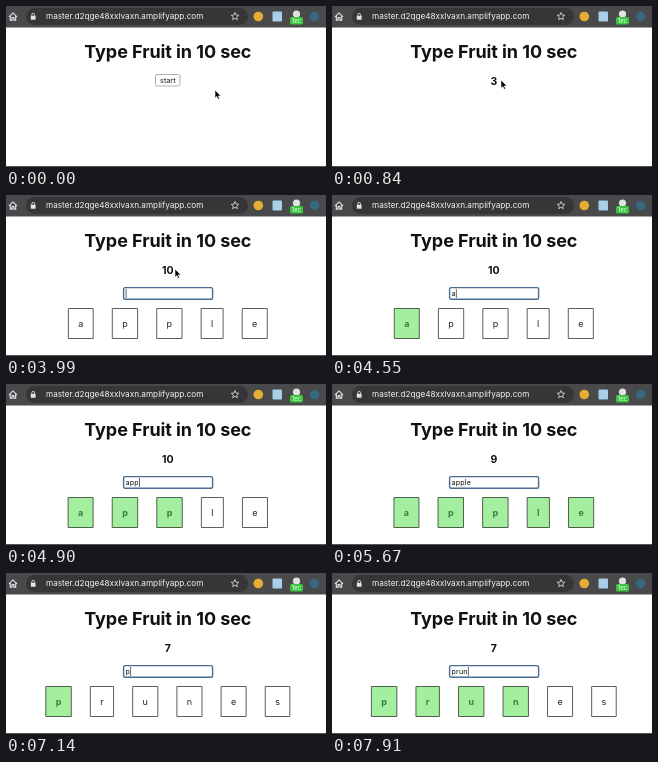
Recreate the animation shown at these times as an HTML page with a canvas. Size 320x161 px, loop 8 s.

```html
<!DOCTYPE html>
<html lang="en">
<head>
<meta charset="utf-8">
<title>Type Fruit</title>
<style>
  html, body { margin: 0; width: 100%; height: 100%; overflow: hidden; background: #fff; }
  canvas { display: block; }
</style>
</head>
<body>
<canvas id="stage" width="320" height="161"></canvas>
<script>
const ctx = document.getElementById('stage').getContext('2d');
const LOOP = 8000, STEP = 70, CENTER = 161.8;
const START = 840, SECOND = 1050, GAME = START + 3 * SECOND;
const ROUNDS = [
  { word: 'apple', at: GAME, keys: [4480, 4690, 4900, 5040, 5180] },
  { word: 'prunes', at: 6230, keys: [6930, 7280, 7420, 7630] },
];

function text(str, x, y, size, { weight = 400, color = '#111', align = 'left', spacing = 0 } = {}) {
  ctx.font = `${weight} ${size}px Inter, sans-serif`;
  ctx.letterSpacing = spacing + 'px';
  ctx.textAlign = align;
  ctx.fillStyle = color;
  ctx.fillText(str, x, y);
}

function box(x, y, w, h, radius, fill, stroke, line = 1) {
  ctx.beginPath();
  ctx.roundRect(x, y, w, h, radius);
  paint(fill, stroke, line);
}

function circle(x, y, r, fill) {
  ctx.beginPath();
  ctx.arc(x, y, r, 0, 7);
  paint(fill);
}

function shape(path, x, y, fill, stroke, line) {
  ctx.save();
  ctx.translate(x, y);
  paint(fill, stroke, line, new Path2D(path));
  ctx.restore();
}

function paint(fill, stroke, line = 1, path) {
  const args = path ? [path] : [];
  if (fill) { ctx.fillStyle = fill; ctx.fill(...args); }
  if (stroke) { ctx.strokeStyle = stroke; ctx.lineWidth = line; ctx.stroke(...args); }
}

function toolbar() {
  ctx.fillStyle = '#49494c';
  ctx.fillRect(0, 0, 320, 21.5);
  box(20, 2, 222, 17, 8.5, '#363639');
  shape('M-4 .3L0-3.6 4 .3M-2.7-.5V3.6H-.9V1H.9V3.6H2.7V-.5', 7, 10.5, null, '#e4e4e6', 1.1);
  box(24.8, 9.8, 4.8, 4, .6, '#e4e4e6');
  shape('M-1.4 0V-1A1.4 1.4 0 0 1 1.4-1V0', 27.2, 9.8, null, '#e4e4e6', .9);
  text('master.d2qge48xxlvaxn.amplifyapp.com', 40, 13.4, 8.2, { color: '#f4f4f5' });

  let star = '';
  for (let i = 0; i < 10; i++) {
    const a = i * Math.PI / 5, r = i % 2 ? 1.8 : 4;
    star += `${i ? 'L' : 'M'}${r * Math.sin(a)} ${-r * Math.cos(a)}`;
  }
  shape(star + 'Z', 229, 10.5, null, '#d0d0d3', .9);

  circle(252.3, 10.5, 4.8, '#e6ad35');
  box(266.5, 5.5, 9.5, 10, 1, '#a9cfe8');
  circle(290.5, 8, 3.6, '#dfe3df');
  box(284, 11, 13, 7.5, 1.5, '#38c53c');
  text('1ec', 290.5, 17, 6, { color: '#fff', align: 'center' });
  circle(308.5, 10.5, 4.8, '#37687f');
}

function letterBoxes(word, done) {
  const pad = 20.6, gap = 18.3;
  const widths = [...word].map((c, i) => {
    ctx.letterSpacing = '0px';
    ctx.font = `${i < done ? 700 : 400} 9px Inter, sans-serif`;
    return ctx.measureText(c).width + pad;
  });
  let x = CENTER - (widths.reduce((a, b) => a + b) + gap * (word.length - 1)) / 2;
  widths.forEach((w, i) => {
    const hit = i < done;
    box(x + .4, 113.5, w - .8, 30, 0, hit ? '#a4eea0' : '#fff', hit ? '#42523f' : '#4c4c4c', .9);
    text(word[i], x + w / 2, 131.8, 9,
      { weight: hit ? 700 : 400, color: hit ? '#34803a' : '#222', align: 'center' });
    x += w + gap;
  });
}

function game(t) {
  const round = ROUNDS.findLast(r => t >= r.at);
  const keys = round.keys.filter(k => t >= k);
  const typed = round.word.slice(0, keys.length);
  box(117.6, 92.6, 89, 11.6, 1.5, '#fff', '#4a6c90', 1.4);
  text(typed, 119.5, 101, 7.2, { spacing: .15 });
  if (t - (keys.at(-1) ?? round.at) < 490) {
    ctx.fillStyle = '#444';
    ctx.fillRect(119.7 + ctx.measureText(typed).width, 94, .8, 9);
  }
  letterBoxes(round.word, keys.length);
}

function cursor(t) {
  const p = Math.min(1, Math.floor(t / STEP) * STEP / 700);
  const k = p * p * (3 - 2 * p);
  shape('M0 0V8.2L1.9 6.5 3.1 9.3 4.5 8.7 3.3 5.9H5.8Z', 209 - 40 * k, 84 - 10 * k, '#000', '#fff', .6);
}

function draw(t) {
  ctx.fillStyle = '#fff';
  ctx.fillRect(0, 0, 320, 161);
  toolbar();
  text('Type Fruit in 10 sec', CENTER, 51.5, 18, { weight: 700, align: 'center', spacing: -.07 });

  if (t < START) {
    box(149.5, 68.5, 24.5, 11.5, 1.5, '#fff', '#9a9a9a', .8);
    text('start', CENTER, 77.2, 7.2, { align: 'center' });
  } else {
    const ticks = Math.floor((t - START) / SECOND);
    const count = t < GAME ? 3 - ticks : 13 - ticks;
    text(count, CENTER, 79, 10.5, { weight: 700, align: 'center' });
  }
  if (t >= GAME) game(t);
  if (t < ROUNDS[0].keys[0]) cursor(t);

  ctx.fillStyle = '#555';
  ctx.fillRect(0, 160, 320, 1);
}

function tick() {
  draw(performance.now() % LOOP);
  requestAnimationFrame(tick);
}
tick();
</script>
</body>
</html>
```
